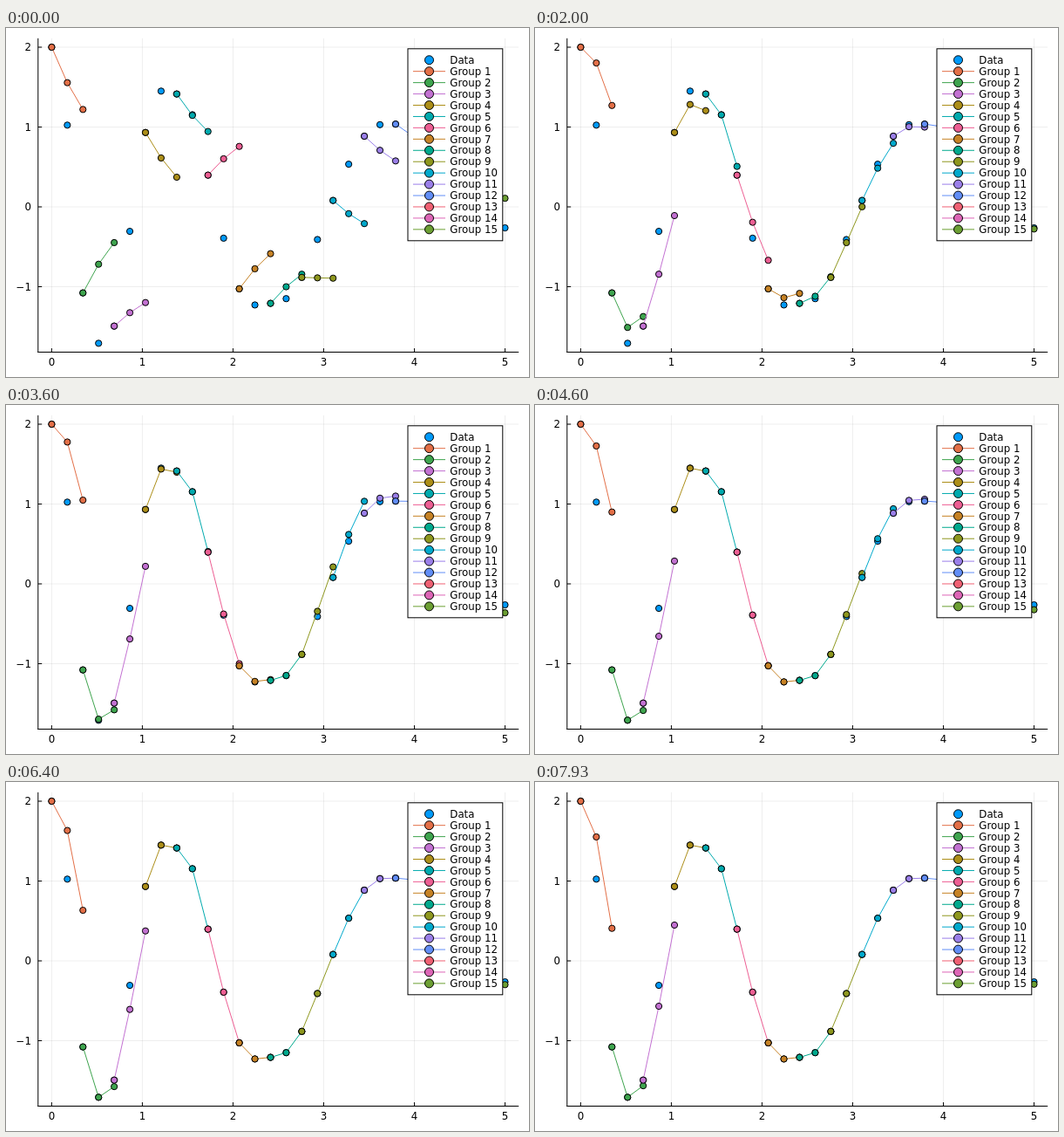
Recreate the animation shown at these times as an HTML page. Size 600 by 400 pixels, loop 8000 ms.

```html
<!DOCTYPE html>
<html lang="en">
<head>
<meta charset="utf-8">
<title>Group fit</title>
<style>
html, body { margin: 0; width: 100%; height: 100%; overflow: hidden; background: #fff; }
svg { display: block; width: 600px; height: 400px; }
text { font: 11.8px "DejaVu Sans", sans-serif; fill: #000; }
</style>
</head>
<body>
<svg id="stage" viewBox="0 0 600 400"></svg>
<script>
const stage = document.getElementById('stage');
const LOOP = 8000, STEPS = 120;
const POINTS = 30, SPAN = 5;
const LEFT = 36.8, RIGHT = 588.2, TOP = 11.8, BOTTOM = 371.5, TICK = 4.4;
const px = v => 52.4 + v * 104.02;
const py = v => 205 - v * 91.5;
const pointX = i => px(i * SPAN / (POINTS - 1));

const BLUE = '#009afa';

// Colour, rise over the untrained segment, then what the fit still misses
// at the second and third point when the loop ends.
const GROUPS = [
  ['#e36f47', -0.78, 0.525, 1.475],
  ['#3ea44e', 0.63, 0, -0.07],
  ['#c371d2', 0.295, -0.26, -0.48],
  ['#ac8e18', -0.56],
  ['#00aaae', -0.47],
  ['#ed5e93', 0.36],
  ['#c68225', 0.44],
  ['#00a98d', 0.365],
  ['#8e971e', -0.01],
  ['#00a9cc', -0.29],
  ['#9b7fe9', -0.31],
  ['#618df6', -0.24],
  ['#f06073', 0],
  ['#dd65b6', 0],
  ['#6c9f33', 0.15, -0.03]
];

// The data: first coordinate of a damped cubic spiral, integrated with RK4.
function spiral() {
  const flow = ([a, b]) => [-0.1 * a ** 3 - 2 * b ** 3, 2 * a ** 3 - 0.1 * b ** 3];
  const move = (u, d, h) => u.map((v, i) => v + d[i] * h);
  const sub = 60, h = SPAN / (POINTS - 1) / sub;
  const out = [];
  let u = [2, 0];
  for (let n = 0; n < POINTS * sub; n++) {
    if (n % sub === 0) out.push(u[0]);
    const a = flow(u), b = flow(move(u, a, h / 2)), c = flow(move(u, b, h / 2)), d = flow(move(u, c, h));
    u = move(u, a.map((v, i) => (v + 2 * b[i] + 2 * c[i] + d[i]) / 6), h);
  }
  return out;
}
const data = spiral();

// Share of the untrained shape left at a step; the later groups swing past the data.
const fade = (step, swings) => swings
  ? Math.exp(-((step / 40) ** 2)) * Math.cos(step * Math.PI / 66)
  : Math.exp(-((step / 22.5) ** 1.65));

function add(tag, attrs, label) {
  const el = document.createElementNS('http://www.w3.org/2000/svg', tag);
  for (const k in attrs) el.setAttribute(k, attrs[k]);
  if (label !== undefined) el.textContent = label;
  return stage.appendChild(el);
}
const line = (x1, y1, x2, y2, stroke = '#000', opacity = 1) =>
  add('line', { x1, y1, x2, y2, stroke, 'stroke-opacity': opacity });
const dot = (cx, cy, fill, r = 3.6) => add('circle', { cx, cy, r, fill, stroke: '#000' });
const text = (x, y, label, anchor = 'start') => add('text', { x, y, 'text-anchor': anchor }, label);

function drawAxes() {
  for (let v = 0; v <= 5; v++) {
    line(px(v), TOP, px(v), BOTTOM, '#000', 0.065);
    line(px(v), BOTTOM, px(v), BOTTOM - TICK);
    text(px(v), 387.2, v, 'middle');
  }
  for (let v = -1; v <= 2; v++) {
    line(LEFT, py(v), RIGHT, py(v), '#000', 0.065);
    line(LEFT, py(v), LEFT + TICK, py(v));
    text(29, py(v) + 4.1, v < 0 ? '\u2212' + -v : v, 'end');
  }
  line(LEFT, TOP, LEFT, BOTTOM + 0.5);
  line(LEFT - 0.5, BOTTOM, RIGHT, BOTTOM);
}

function drawGroup([color, rise, ...misses], g) {
  const first = g * 2;
  const truth = data.slice(first, first + 3);
  const path = add('polyline', { fill: 'none', stroke: color });
  const dots = truth.map((v, i) => dot(pointX(first + i), py(v), color));
  return step => {
    const left = fade(step, g > 7);
    const slow = 1 + 0.8 * (1 - step / STEPS);
    const ys = truth.map((v, i) => {
      if (i === 0) return py(v);
      const raw = truth[0] + rise * (i === 1 ? 0.57 : 1);
      const fit = v + (misses[i - 1] || 0) * slow;
      return py(fit + (raw - fit) * left);
    });
    path.setAttribute('points', ys.map((y, i) => pointX(first + i) + ',' + y).join(' '));
    ys.forEach((y, i) => dots[i].setAttribute('cy', y));
  };
}

function drawLegend() {
  const x = 461, y = 23.8, height = 220, row = height / (GROUPS.length + 2);
  add('rect', { x, y, width: 108.8, height, fill: '#fff', stroke: '#000' });
  for (let i = 0; i <= GROUPS.length; i++) {
    const mid = y + row * (i + 1), color = i ? GROUPS[i - 1][0] : BLUE;
    if (i) line(x + 6, mid, x + 43, mid, color);
    dot(x + 24.5, mid, color, 5);
    text(x + 48.3, mid + 4.2, i ? 'Group ' + i : 'Data');
  }
}

drawAxes();
data.forEach((v, i) => dot(pointX(i), py(v), BLUE));
const updates = GROUPS.map(drawGroup);
drawLegend();

const render = step => updates.forEach(update => update(step));
const began = performance.now();
function tick() {
  const t = (performance.now() - began) % LOOP;
  render(Math.min(STEPS - 1, Math.floor(t * STEPS / LOOP + 0.05)));
  requestAnimationFrame(tick);
}
render(0);
requestAnimationFrame(tick);
</script>
</body>
</html>
```
